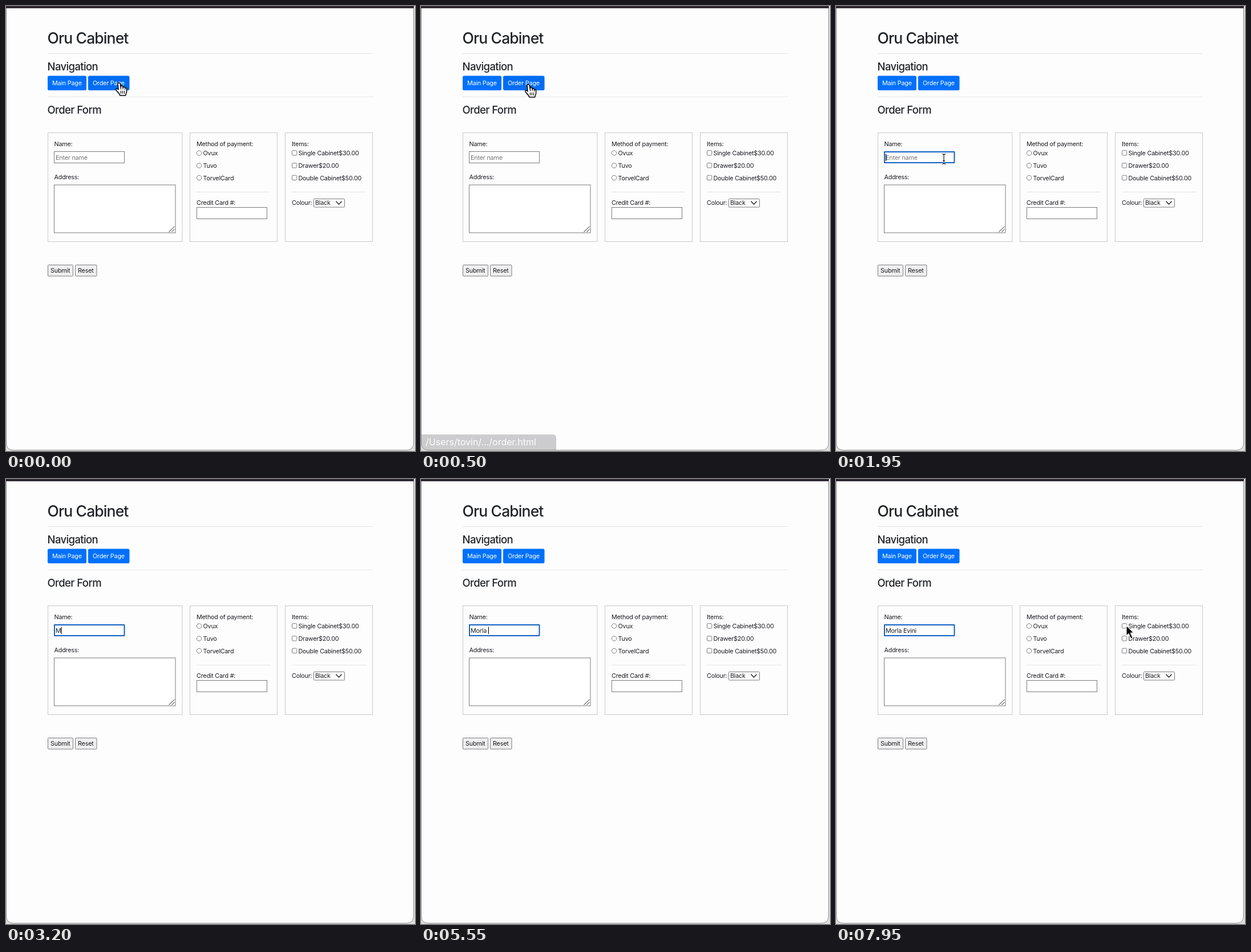
Write an HTML page that moves like this. It is 717 by 781 pixels and loops after 8000 ms.

```html
<!DOCTYPE html>
<html lang="en">
<head>
<meta charset="utf-8">
<title>Order form</title>
<style>
  html, body { margin: 0; width: 100%; height: 100%; overflow: hidden; background: #dededf; }
  svg { display: block; width: 717px; height: 781px; }
  text { font: 10.8px Inter, Roboto, sans-serif; letter-spacing: -.02em; fill: #1b1c20; white-space: pre; }
  .head { font-weight: 500; font-size: 18.5px; letter-spacing: -.033em; fill: #212529; }
  .title { font-size: 26.5px; }
  .light { fill: #fff; }
  .hint { fill: #757575; }
  .status { font-size: 16px; letter-spacing: 0; fill: #fff; }
  .rule { stroke: #e5e4e6; }
  .panel { fill: none; stroke: #c9c8ca; }
  .field { fill: #fff; stroke: #7b7b7d; }
  .button { fill: #efeff0; stroke: #7b7b7d; }
  .blue { fill: #0071fb; }
  .ink { fill: none; stroke: #222; }
</style>
</head>
<body>
<svg viewBox="0 0 717 781">
  <path d="M.5 0V767Q.5 779.5 13 779.5H702Q714.5 779.5 714.5 767V0" fill="#fefdfe" stroke="#8d8c8f"/>
  <rect width="715" height="4" fill="#2d2830"/>

  <text class="head title" x="72.5" y="66">Oru Cabinet</text>
  <text class="head" x="72.5" y="112.5">Navigation</text>
  <text class="head" x="72.5" y="188.5">Order Form</text>
  <path class="rule" d="M73 83.5H643M73 159.5H643M334 326.5H464M501 326.5H632"/>

  <rect class="blue" x="73" y="122.5" width="68" height="25.5" rx="2.8"/>
  <rect class="blue" id="order" x="144" y="122.5" width="72.5" height="25.5" rx="2.8"/>
  <text class="light" x="81" y="139">Main Page</text>
  <text class="light" x="152" y="139">Order Page</text>

  <rect class="panel" x="73.5" y="222.5" width="235.5" height="191"/>
  <rect class="panel" x="322.5" y="222.5" width="153" height="191"/>
  <rect class="panel" x="489.5" y="222.5" width="153" height="191"/>

  <text x="84.5" y="246">Name:</text>
  <rect class="field" x="84.5" y="255.5" width="123" height="20"/>
  <rect id="ring" x="85" y="256" width="122.5" height="19" rx="1" fill="none" stroke="#1261c4" stroke-width="2"/>
  <text class="hint" id="hint" x="87" y="269.5">Enter name</text>
  <text id="typed" x="87" y="269.5"></text>
  <rect id="caret" y="259.5" width="1.1" height="12.5" fill="#000"/>
  <text x="84.5" y="304">Address:</text>
  <rect class="field" x="84.5" y="314" width="212.5" height="84"/>
  <path class="ink" d="M285.5 396.5L295.5 387M290.5 396.5L295.5 391.7"/>

  <text x="334" y="246">Method of payment:</text>
  <text x="334" y="349">Credit Card #:</text>
  <rect class="field" x="334.5" y="353.5" width="123" height="20"/>

  <text x="501" y="246">Items:</text>
  <text x="501" y="349">Colour:</text>
  <rect class="field" x="539.5" y="338.5" width="54" height="14.5" rx="1"/>
  <text x="542" y="349">Black</text>
  <path class="ink" d="M578.5 342.8L583.5 348L588.5 342.8" stroke-width="1.4"/>
  <g id="choices"></g>

  <rect class="button" x="73.5" y="454.5" width="44" height="19.5" rx="1"/>
  <text x="78" y="468">Submit</text>
  <rect class="button" x="121.5" y="454.5" width="37.5" height="19.5" rx="1"/>
  <text x="126" y="468">Reset</text>

  <g id="status">
    <path d="M1 752H231Q237 752 237 758V779H13Q1 779 1 767Z" fill="#363437"/>
    <text class="status" x="8" y="771">/Users/tovin/.../order.html</text>
  </g>

  <g id="hand" stroke-linejoin="round" stroke-linecap="round">
    <path d="M-1 1.5C-1-1 2.8-1 3.2 1.5L4.4 8C5-.2 8 6 8 8C9 6.4 11.3 6.8 11.6 9C13 8 14.6 9 14.6 11V15C14.6 17.5 13 18.5 12.7 22H2.8C2.6 19-1.2 16.5-4 12.6C-5.2 10.6-2.8 9 0 11.6Z" fill="#fff" stroke="#000" stroke-width="1.5"/>
    <path d="M4.4 8V11M8 8V11M11.6 9V11.5M4.5 14V18.5M7.5 14V18.5M10.5 14V18.5" fill="none" stroke="#000" stroke-width="1.1"/>
  </g>
  <path id="arrow" d="M0 0V18.2L4.1 14.4L7.9 23.2L11.2 21.8L7.4 13.2H13Z" fill="#000" stroke="#fff" stroke-width="1.2" stroke-linejoin="round"/>
  <g id="beam" fill="none">
    <path d="M-3-9Q0-9 0-6.5Q0-9 3-9M0-7V7M-3 9Q0 9 0 6.5Q0 9 3 9M-1.8 3H1.8" stroke="#fff" stroke-width="2.6"/>
    <path d="M-3-9Q0-9 0-6.5Q0-9 3-9M0-7V7M-3 9Q0 9 0 6.5Q0 9 3 9M-1.8 3H1.8" stroke="#000" stroke-width="1.1"/>
  </g>
</svg>
<script>
const $ = id => document.getElementById(id);
const LOOP = 8000;
const NAME = 'Morla Evini';

// One time per typed letter
const KEYS = [3200, 3500, 4050, 4350, 4800, 5200, 5800, 5950, 6100, 6250, 6400];
const FOCUS = 1600;

// Pointer stops: time, x, y
const PATH = [
  [0, 197, 135], [150, 194, 135], [450, 187, 138], [750, 187, 138],
  [900, 185, 155], [1050, 180, 190], [1200, 177, 224], [1350, 175, 246],
  [1500, 174, 262], [1600, 174, 264], [1850, 176, 264], [2050, 202, 273],
  [6700, 202, 273], [6850, 270, 290], [7100, 421, 293], [7300, 474, 288],
  [7500, 495, 276], [7700, 506, 262], [7900, 509, 257], [LOOP, 509, 257]
];
// Pointer shapes from a given time on
const SHAPES = [[0, 'hand'], [850, 'arrow'], [1450, 'beam'], [2100, ''], [6700, 'beam'], [6800, 'arrow']];
const FADE = [[0, 0], [50, 0], [150, 1], [350, 1], [550, 0], [LOOP, 0]];

function addChoices() {
  const rows = [258, 280, 301.5];
  const cards = ['Ovux', 'Tuvo', 'TorvelCard'];
  const items = ['Single Cabinet$30.00', 'Drawer$20.00', 'Double Cabinet$50.00'];
  $('choices').innerHTML = rows.map((y, i) => `
    <circle class="field" cx="338.6" cy="${y}" r="4.2"/>
    <text x="345.5" y="${y + 4}">${cards[i]}</text>
    <rect class="field" x="501.5" y="${y - 4.3}" width="8.3" height="8.3" rx="1.5"/>
    <text x="512.5" y="${y + 4}">${items[i]}</text>`).join('');
}

function sample(table, t) {
  const i = Math.max(1, table.findIndex(row => row[0] >= t));
  const a = table[i - 1], b = table[i];
  const k = (t - a[0]) / (b[0] - a[0]);
  return a.slice(1).map((v, n) => v + (b[n + 1] - v) * k);
}

const show = (id, on) => $(id).setAttribute('visibility', on ? 'visible' : 'hidden');

function drawPointer(t) {
  const shape = SHAPES.filter(s => s[0] <= t).pop()[1];
  const [x, y] = sample(PATH, t);
  for (const id of ['hand', 'arrow', 'beam']) {
    show(id, id === shape);
    $(id).setAttribute('transform', `translate(${x.toFixed(1)} ${y.toFixed(1)})`);
  }
}

function drawName(t) {
  const count = KEYS.filter(k => k <= t).length;
  const text = NAME.slice(0, count);
  const typed = $('typed');
  if (typed.textContent !== text) typed.textContent = text;
  show('ring', t >= FOCUS);
  show('hint', !count);
  const since = t - (count ? KEYS[count - 1] : FOCUS);
  show('caret', since >= 0 && since % 1000 < 500);
  $('caret').setAttribute('x', 87 + (count ? typed.getComputedTextLength() : 0));
}

function draw(now) {
  const t = now % LOOP;
  drawPointer(t);
  drawName(t);
  $('status').setAttribute('opacity', sample(FADE, t)[0]);
  $('order').style.fill = t < 850 ? '#006df2' : '';
}

addChoices();
const start = performance.now();
(function tick() {
  draw(performance.now() - start);
  requestAnimationFrame(tick);
})();
</script>
</body>
</html>
```
